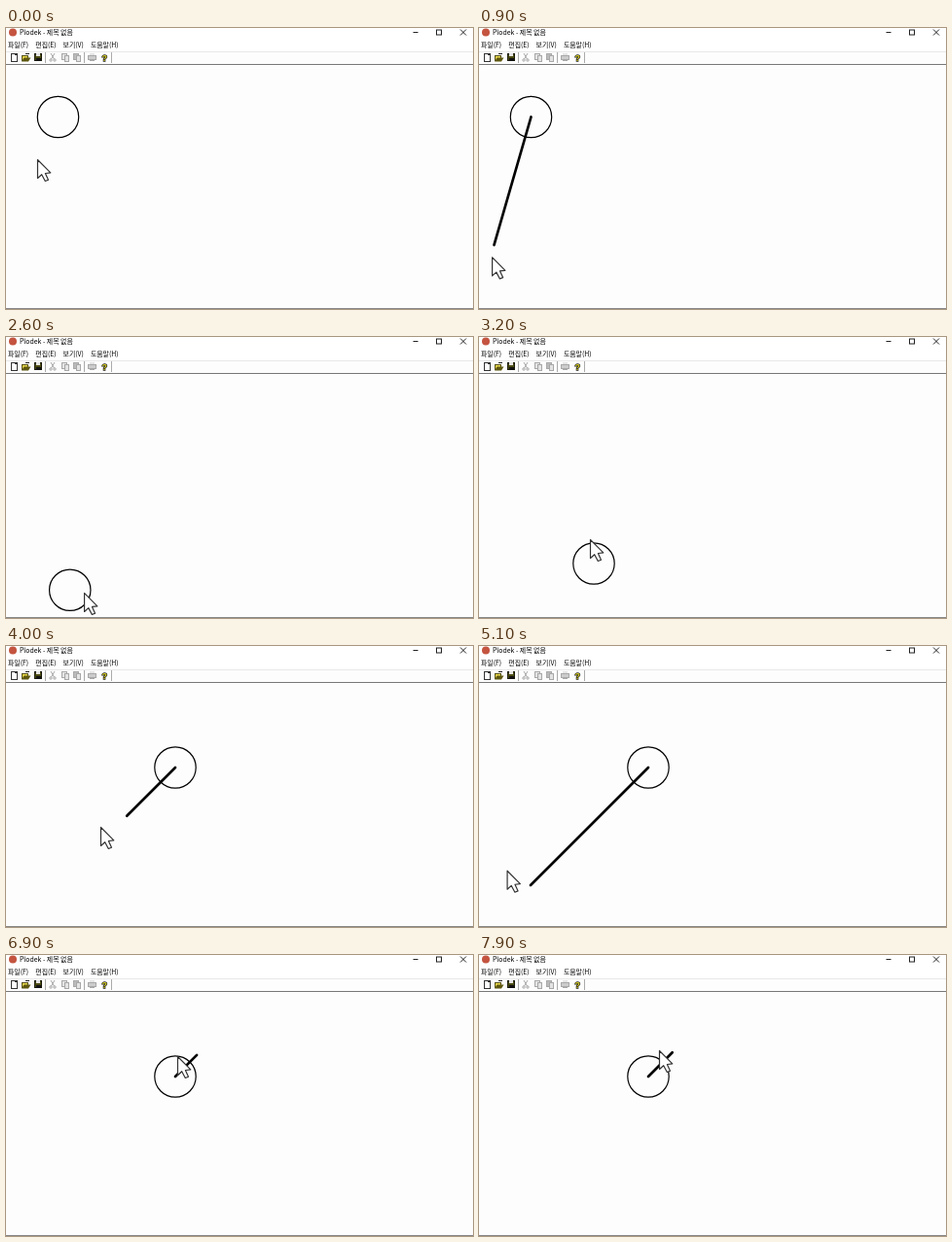
Write an HTML page with a canvas that moves like this. It is 480 px wide and 289 px high and loops after 8 s.

```html
<!DOCTYPE html>
<html lang="ko">
<head>
<meta charset="utf-8">
<style>
  html, body { margin: 0; width: 480px; height: 289px; overflow: hidden; background: #fff; }
  canvas { display: block; }
</style>
</head>
<body>
<canvas id="stage" width="480" height="289"></canvas>
<script>
const ctx = document.getElementById('stage').getContext('2d');
const LOOP = 8000, STEP = 100, RADIUS = 21.2;
const PICK_UP = 2500, DROP = 3800;
const FIRST = { x: 53.5, y: 91.5 }, SECOND = { x: 174, y: 125 };
const FONT = '"Noto Sans CJK KR", "Noto Sans CJK", "Noto Sans", sans-serif';

// Turning points of the hand: time, x, y
const route = [
  [0, 32, 135], [1200, 9, 254], [1800, 8, 245], [2000, 8, 245],
  [2700, 91, 264], [3100, 118, 233], [3200, 114, 208], [3700, 163, 132],
  [4000, 97, 186], [5000, 32, 225], [5600, 18, 259], [6400, 235, 70],
  [6900, 176, 104], [7300, 140, 140], [7600, 205, 74], [7900, 185, 98]
];

// Slope that stays flat at turning points, so the path never overshoots.
function slope(i, axis) {
  const a = route[i - 1], b = route[i], c = route[i + 1];
  if (!a || !c) return 0;
  const before = (b[axis] - a[axis]) / (b[0] - a[0]);
  const after = (c[axis] - b[axis]) / (c[0] - b[0]);
  return before * after <= 0 ? 0 : 2 * before * after / (before + after);
}

function pointer(t) {
  const next = route.findIndex(p => p[0] > t);
  const i = next < 0 ? route.length - 2 : Math.max(0, next - 1);
  const a = route[i], b = route[i + 1], span = b[0] - a[0];
  const u = Math.min(1, Math.max(0, (t - a[0]) / span)), v = 1 - u;
  const along = k => a[k] * (1 + 2 * u) * v * v + b[k] * (3 - 2 * u) * u * u +
    span * u * v * (slope(i, k) * v - slope(i + 1, k) * u);
  return { x: along(1), y: along(2) };
}

function rect(color, x, y, w, h) {
  ctx.fillStyle = color;
  ctx.fillRect(x, y, w, h);
}

function box(edge, fill, x, y, w, h) {
  rect(edge, x, y, w, h);
  rect(fill, x + 1, y + 1, w - 2, h - 2);
}

function line(x1, y1, x2, y2, color = '#222', width = 1) {
  ctx.strokeStyle = color;
  ctx.lineWidth = width;
  ctx.beginPath();
  ctx.moveTo(x1, y1);
  ctx.lineTo(x2, y2);
  ctx.stroke();
}

function disc(x, y, r) {
  ctx.beginPath();
  ctx.arc(x, y, r, 0, Math.PI * 2);
}

function text(label, x, y, size) {
  ctx.font = `${size}px ${FONT}`;
  ctx.fillStyle = '#000';
  ctx.fillText(label, x, y);
}

function drawTools() {
  const gray = '#a8a8a8', pale = '#e4e4e4';
  rect('#e8e8e8', 0, 24, 480, 1);
  rect('#777', 0, 37, 480, 1);
  for (const x of [40, 80, 108]) rect('#aaa', x, 25, 1, 11);

  // New, open and save
  box('#333', '#fff', 5, 26, 7, 9);
  rect('#333', 9, 26, 2, 2);
  box('#55501a', '#e8d84c', 16, 28, 7, 6);
  ctx.fillStyle = '#5d570e';
  ctx.fill(new Path2D('M16 34.5 L18.5 30.5 H25.5 L23 34.5 Z'));
  line(20, 26.5, 24, 26.5);
  box('#1b1b0a', '#4c4c14', 29, 26, 8, 8);
  rect(pale, 31, 26, 4, 3);
  rect('#111', 31, 31, 5, 3);

  // Cut, copy, paste and print are disabled
  for (const side of [-1, 1]) {
    line(48 - side * 2, 26, 48 + side * 1.5, 32, gray);
    disc(48 + side * 2, 33, 1.2);
    ctx.stroke();
  }
  for (const x of [57, 69]) {
    box(gray, x > 60 ? '#bbb' : pale, x, 26, 6, 7);
    box(gray, pale, x + 3, 28, 5, 7);
  }
  rect(pale, 86, 26, 5, 3);
  box(gray, '#ccc', 84, 28, 9, 5);
  rect(gray, 86, 33, 5, 1);

  ctx.font = 'bold 9px "Liberation Sans", Arial, sans-serif';
  ctx.strokeStyle = '#222';
  ctx.lineWidth = 1.4;
  ctx.strokeText('?', 98.5, 33.5);
  ctx.fillStyle = '#d9cf20';
  ctx.fillText('?', 98.5, 33.5);
}

function drawWindow() {
  rect('#fdfdfd', 0, 0, 480, 289);
  rect('#fff', 0, 0, 480, 24);
  disc(7, 4.5, 4);
  ctx.fillStyle = '#c4543f';
  ctx.fill();
  text('Plodek - 제목 없음', 14, 7, 6.9);
  line(418.5, 4.5, 423.5, 4.5);
  ctx.strokeRect(442.5, 2, 5, 5);
  line(467, 1.5, 473, 7.5);
  line(473, 1.5, 467, 7.5);
  ['파일(F)', '편집(E)', '보기(V)', '도움말(H)']
    .forEach((label, i) => text(label, 2 + 28.3 * i, 20, 6.9));
  drawTools();
  rect('#888', 0, 288, 480, 1);
}

const arrow = new Path2D('M0 0 V19 L4.2 15.2 L7.8 22 L11 20.7 L7.9 14 L13.3 13.4 Z');

function drawPointer({ x, y }) {
  ctx.save();
  ctx.translate(x + 0.5, y + 0.5);
  ctx.lineJoin = 'round';
  ctx.lineWidth = 1.2;
  ctx.fillStyle = '#fff';
  ctx.strokeStyle = '#333';
  ctx.fill(arrow);
  ctx.stroke(arrow);
  ctx.restore();
}

function drawShape(t) {
  const hand = pointer(t - STEP);
  const dragging = t >= PICK_UP && t < DROP;
  const center = dragging ? hand : t < PICK_UP ? FIRST : SECOND;
  ctx.strokeStyle = '#000';
  ctx.lineWidth = 1.2;
  disc(center.x, center.y, RADIUS);
  ctx.stroke();
  if (dragging || t < STEP) return;

  let end = hand;
  if (t >= DROP) {
    // The second handle slides along a diagonal.
    const reach = (hand.x - center.x - hand.y + center.y) / 2;
    end = { x: center.x + reach, y: center.y - reach };
  }
  ctx.lineCap = 'round';
  line(center.x, center.y, end.x, end.y, '#000', 2.7);
  ctx.lineCap = 'butt';
}

function render(now) {
  const t = Math.floor((now % LOOP) / STEP) * STEP;
  drawWindow();
  ctx.save();
  ctx.beginPath();
  ctx.rect(0, 38, 480, 250);
  ctx.clip();
  drawShape(t);
  ctx.restore();
  drawPointer(pointer(t));
}

const start = performance.now();
function tick() {
  render(performance.now() - start);
  requestAnimationFrame(tick);
}
tick();
</script>
</body>
</html>
```
